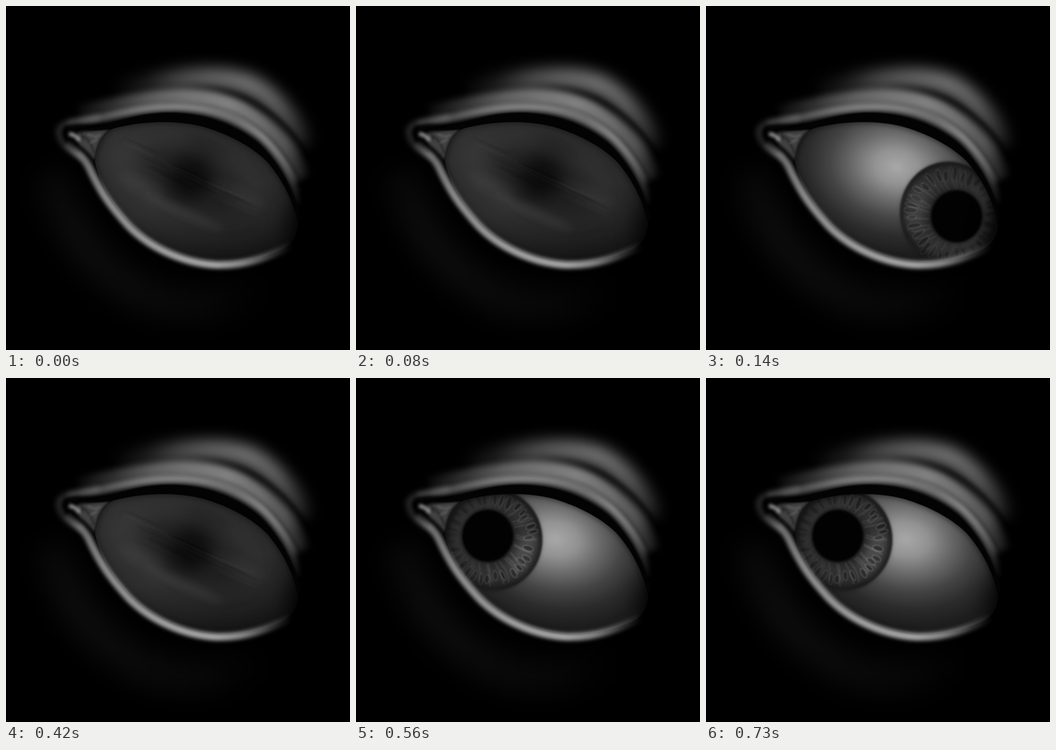
An HTML page with a canvas that plays this animation: 700 by 700 pixels, repeating every 0.84 s.

```html
<!DOCTYPE html>
<html>
<head>
<meta charset="utf-8">
<style>
html, body { margin: 0; height: 100%; background: #000; overflow: hidden; }
canvas { display: block; width: 700px; height: 700px; }
</style>
</head>
<body>
<canvas id="stage" width="700" height="700"></canvas>
<script>
const stage = document.getElementById('stage').getContext('2d');
const ball = new Path2D('M181 318C184 285 198 260 218 249C270 235 340 230 400 245C460 262 505 290 530 315C560 348 585 395 594 440C594 470 580 488 560 496C520 515 480 521 440 521C380 518 320 497 275 462C230 425 195 375 181 318Z');
const TILT = 0.416;
let g, seed;

const rnd = () => (seed = seed * 16807 % 2147483647) / 2147483647;
const white = a => `rgba(255,255,255,${a})`;
const black = a => `rgba(0,0,0,${a})`;
const gray = v => `rgb(${v},${v},${v})`;

// stops: x, alpha, x, alpha, ...
function fade(tone, stops) {
  const grad = g.createLinearGradient(0, 0, 700, 0);
  for (let i = 0; i < stops.length; i += 2) grad.addColorStop(stops[i] / 700, tone(stops[i + 1]));
  return grad;
}

const path = d => d instanceof Path2D ? d : new Path2D(d);
const soften = blur => { g.filter = blur ? `blur(${blur}px)` : 'none'; };

function line(d, width, blur, style) {
  soften(blur);
  g.lineWidth = width;
  g.strokeStyle = style;
  g.stroke(path(d));
}

function area(d, blur, style) {
  soften(blur);
  g.fillStyle = style;
  g.fill(path(d));
}

function oval(x, y, rx, ry, turn = 0) {
  const p = new Path2D();
  p.ellipse(x, y, rx, ry, turn, 0, 7);
  return p;
}

function lids() {
  // cheek
  line('M85 340C115 440 175 530 275 585C350 620 440 615 520 570', 70, 26,
    fade(white, [60, .025, 140, .05, 260, .045, 400, .03, 530, 0]));
  // brow folds
  line('M230 178C330 145 450 132 512 168C556 198 588 240 610 285', 40, 15,
    fade(white, [220, .02, 290, .13, 350, .3, 410, .4, 490, .48, 550, .4, 595, .2, 625, 0]));
  line('M150 221C290 188 400 172 480 214C536 248 578 295 606 350', 38, 7,
    fade(white, [140, .02, 210, .17, 300, .34, 380, .44, 450, .5, 520, .42, 570, .3, 605, .1, 620, 0]));
  line('M360 163C430 161 490 182 535 216C572 245 600 277 628 325', 9, 5,
    fade(black, [370, 0, 430, .28, 490, .55, 560, .75, 628, .85]));
  // upper lid rim
  line('M125 240C200 232 260 207 330 207C410 205 470 230 520 268C560 305 585 350 600 402', 16, 4,
    fade(white, [110, .06, 160, .2, 260, .3, 340, .34, 400, .36, 480, .36, 550, .34, 575, .25, 600, 0]));
  line('M215 214C300 194 410 190 473 220C530 252 570 297 603 362', 4, 3.5,
    fade(black, [215, 0, 300, .16, 400, .2, 500, .28, 600, .5]));
}

function corner() {
  line('M190 226C135 231 100 240 109 264C115 284 132 297 155 308', 11, 6, white(.17));
  line('M205 245C170 250 142 241 123 249C115 262 130 281 150 296', 9, 3, black(.85));
  area('M146 257L214 250C195 262 183 285 181 316C172 300 158 290 148 281Z', 3, gray(66));
  line('M156 264C168 272 176 284 179 300', 4, 2, black(.4));
  line('M166 260C176 266 184 268 193 262M170 280C176 275 182 275 186 270', 3, 2, white(.18));
  line('M128 260C138 262 147 266 148 275', 8, 3, white(.55));
  line('M152 255L157 274', 4, 2, black(.35));
}

function edges() {
  area('M160 252C240 232 270 218 330 217C410 217 470 245 515 282C555 320 585 370 600 430L594 440C585 395 560 348 530 315C505 290 460 262 400 245C340 230 270 235 218 249C200 253 180 254 160 252Z', 1.3, gray(3));
  const rim = 'M122 280C134 294 154 301 167 325C188 370 206 400 248 446C292 492 362 524 430 527C490 528 535 511 582 486';
  line(rim, 17, 3.5, fade(white, [115, .05, 150, .3, 200, .44, 300, .48, 420, .48, 480, .4, 520, .26, 555, .12, 582, 0]));
  line(rim, 8, 3, fade(white, [120, 0, 160, .18, 250, .25, 330, .33, 430, .38, 490, .22, 540, .03, 580, 0]));
}

function sclera(x, y) {
  g.save();
  g.translate(x, y);
  g.rotate(.2);
  g.scale(1, .76);
  const grad = g.createRadialGradient(0, 0, 0, 0, 0, 230);
  [168, 146, 105, 68, 43, 29].forEach((v, i) => grad.addColorStop(i / 5, gray(v)));
  g.fillStyle = grad;
  g.fillRect(-600, -800, 1200, 1600);
  g.restore();
}

function iris(x, y, px, py, light, power) {
  const RX = 98, RY = 103, R = 52;
  area(oval(x, y, RX, RY), 2, gray(34));
  const glow = g.createRadialGradient(px, py, 45, x, y, 100);
  glow.addColorStop(0, gray(28));
  glow.addColorStop(.4, gray(48));
  glow.addColorStop(.75, gray(44));
  glow.addColorStop(1, gray(32));
  area(oval(x, y, RX - 2, RY - 2), 2, glow);
  area(oval(x + 68 * Math.cos(light), y + 68 * Math.sin(light), 18, 48, light), 12, white(.13 * power));

  const at = (a, t) => [
    px + R * Math.cos(a) + t * (x - px + (RX - R) * Math.cos(a)),
    py + R * Math.sin(a) + t * (y - py + (RY - R) * Math.sin(a))
  ];
  const lit = a => Math.pow(.5 + .5 * Math.cos(a - light), 1.3);
  seed = 77;
  for (let i = 0; i < 32; i++) {
    const a = (i + rnd() * .6) * Math.PI / 16;
    const [cx, cy] = at(a, .5 + rnd() * .2);
    const cell = oval(cx, cy, 9 + rnd() * 7, 3.5 + rnd() * 2.5, a + (rnd() - .5) * .3);
    area(cell, 2, black(.15 + rnd() * .2));
    line(cell, 2, 1.3, white((.02 + .14 * lit(a)) * power));
  }
  for (let i = 0; i < 36; i++) {
    const a = (i + rnd()) * Math.PI / 18;
    const p = new Path2D();
    p.moveTo(...at(a, .08));
    p.quadraticCurveTo(...at(a + (rnd() - .5) * .2, .5), ...at(a + (rnd() - .5) * .1, .7 + rnd() * .2));
    line(p, 2 + rnd() * 1.5, 1.5, white((.01 + .1 * lit(a)) * power));
  }
  line(oval(x, y, RX - 3, RY - 3), 7, 4, black(.25));
  area(oval(px, py, R, R + 1), 2, gray(2));
}

function sweep() {
  const grad = g.createLinearGradient(350, 230, 430, 525);
  grad.addColorStop(0, gray(58));
  grad.addColorStop(.55, gray(50));
  grad.addColorStop(1, gray(25));
  area(ball, 0, grad);
  line(ball, 50, 18, black(.2));
  area(oval(378, 352, 115, 55, TILT), 24, black(.4));
  area(oval(375, 350, 42, 48, TILT), 18, black(.6));
  area(oval(410, 285, 50, 16, TILT), 14, black(.2));
  area(oval(470, 385, 60, 12, TILT), 12, white(.07));
  area(oval(360, 420, 90, 8, TILT), 9, white(.08));
  area(oval(275, 365, 50, 12, TILT), 12, white(.06));
  seed = 31;
  for (let i = 0; i < 18; i++) {
    const x = 275 + i * 12;
    const y = 352 + (x - 375) * .45 + (rnd() - .5) * 46;
    area(oval(x, y, 35 + rnd() * 40, 1.2 + rnd(), TILT), 1.8, i % 2 ? white(.025) : black(.15));
  }
}

const looks = [
  sweep,
  () => { sclera(388, 328); iris(493, 420, 510, 428, 3.35, .8); },
  () => { sclera(406, 328); iris(281, 329, 268, 321, .45, 1.25); }
];

const views = looks.map(look => {
  const c = document.createElement('canvas');
  c.width = c.height = 700;
  g = c.getContext('2d');
  g.fillStyle = '#000';
  g.fillRect(0, 0, 700, 700);
  lids();
  corner();
  g.save();
  g.clip(ball);
  look();
  line(ball, 8, 5, black(.4));
  area(oval(600, 455, 32, 65, .1), 18, black(.65));
  g.restore();
  edges();
  return c;
});

const start = performance.now();
function tick() {
  const t = (performance.now() - start) % 840;
  stage.drawImage(views[t < 140 ? 0 : t < 420 ? 1 : t < 560 ? 0 : 2], 0, 0);
  requestAnimationFrame(tick);
}
tick();
</script>
</body>
</html>
```
